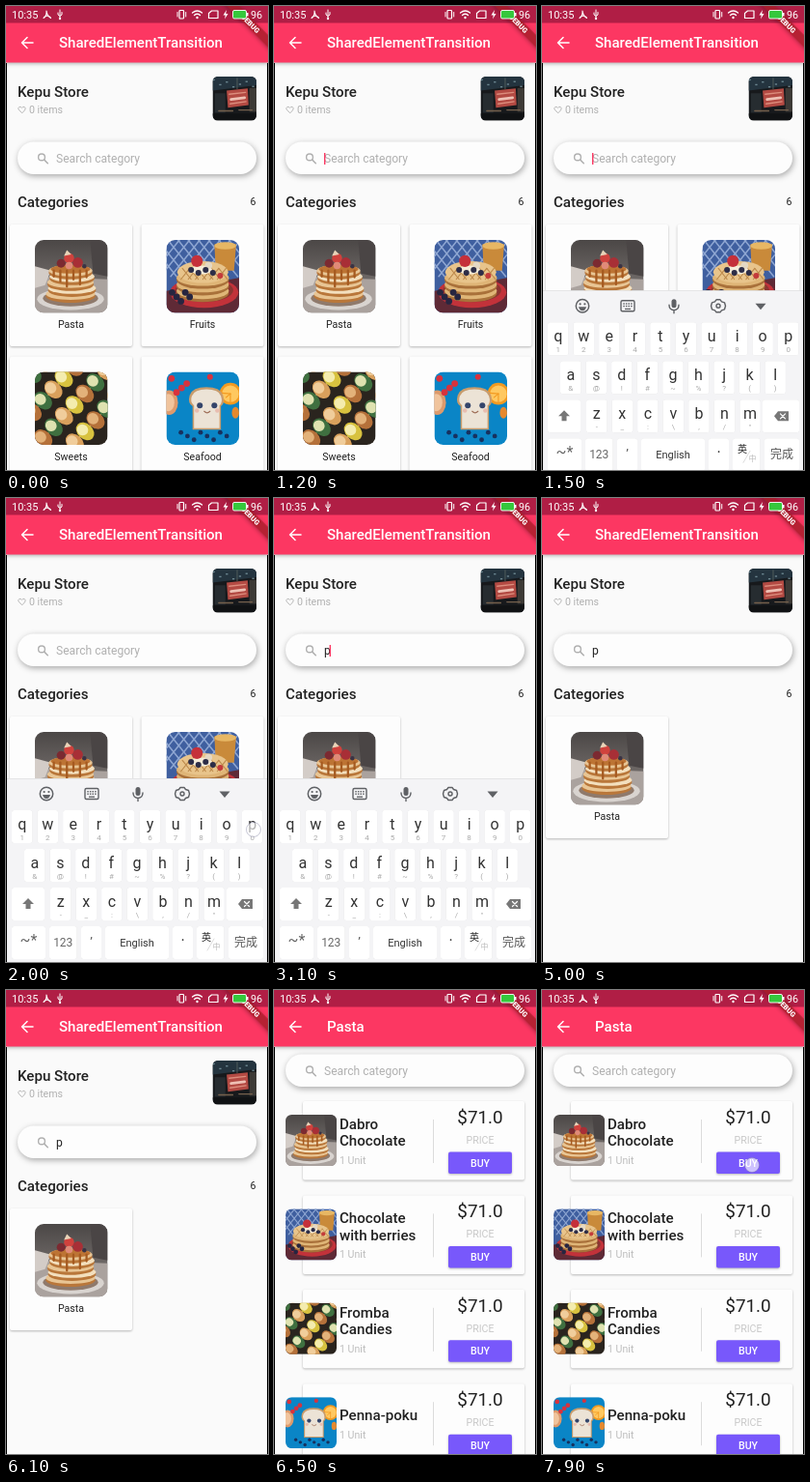
An HTML page for the animation above (8000 ms loop, 272 by 480 pixels).

```html
<!DOCTYPE html>
<html lang="en">
<head>
<meta charset="utf-8">
<title>Shared element transition</title>
<style>
  html, body { margin: 0; width: 100%; height: 100%; overflow: hidden; background: #fafafa; }
  svg { display: block; width: 272px; height: 480px; font-family: Roboto, "Noto Sans CJK SC", "Noto Sans CJK", sans-serif; }
  .bar { filter: drop-shadow(0 1.5px 2px #0005); }
  .pill { filter: drop-shadow(1px 2px 3px #0005); }
  .card { filter: drop-shadow(0 1px 1px #0004); }
  .key { filter: drop-shadow(0 .5px .5px #0002); }
  .line { fill: none; stroke-linecap: round; stroke-linejoin: round; }
</style>
</head>
<body>
<svg id="stage" viewBox="0 0 272 480"></svg>
<script>
const stage = document.getElementById('stage');
const PINK = '#fc3762', INK = '#212121', GREY = '#b0b0b0', ICON = '#5f6165', PAPER = '#fdfdfd';

const rect = (x, y, w, h, fill, extra = '') =>
  `<rect x="${x}" y="${y}" width="${w}" height="${h}" fill="${fill}" ${extra}/>`;
const circle = (x, y, r, fill, extra = '') => `<circle cx="${x}" cy="${y}" r="${r}" fill="${fill}" ${extra}/>`;
const oval = (x, y, rx, ry, fill) => `<ellipse cx="${x}" cy="${y}" rx="${rx}" ry="${ry}" fill="${fill}"/>`;
const line = (d, color, width = 1) => `<path class="line" d="${d}" stroke="${color}" stroke-width="${width}"/>`;
const shape = (d, fill) => `<path d="${d}" fill="${fill}"/>`;
const text = (x, y, str, size, fill = INK, extra = '') =>
  `<text x="${x}" y="${y}" font-size="${size}" fill="${fill}" ${extra}>${str}</text>`;
const mid = 'text-anchor="middle"', bold = 'font-weight="500"';
const times = (n, fn) => Array.from({ length: n }, (_, i) => fn(i)).join('');
const photo = (name, x, y, size, id = '') =>
  `<use href="#${name}" ${id && `id="${id}"`} x="${x}" y="${y}" width="${size}" height="${size}"/>`;

// Pictures, each on a 100 x 100 board
const pictures = {
  pancakes: () =>
    rect(0, 0, 100, 100, 'url(#dusk)') + shape('M0 50L100 54V100H0Z', '#aaa29e') +
    shape('M0 36L22 42 14 62 0 66Z', '#d3ccc7') + shape('M76 0h24v50L80 46Z', '#4a4545') +
    oval(49, 81, 46, 15, '#d9d4d0') + oval(49, 80, 38, 11, '#8f7a6c') +
    times(5, i => oval(49 + i % 2 * 2, 77 - i * 8, 34 - i, 9, '#b9773a') +
      oval(49 + i % 2 * 2, 74 - i * 8, 34 - i, 8, i % 2 ? '#f3dfbd' : '#e8c594')) +
    oval(49, 40, 27, 6, '#bd7434') +
    times(6, i => line(`M${26 + i * 9} 42v${8 + i * 7 % 17}`, '#a55a20', 3)) +
    circle(36, 32, 6, '#7c2a31') + circle(47, 25, 7, '#d0423d') + circle(59, 31, 7, '#a82f36') +
    circle(47, 35, 5, '#e08a78') + circle(68, 36, 3, '#3b3344') + shape('M40 22l4-8 6 6Z', '#e9d3b8'),
  waffle: () =>
    rect(0, 0, 100, 100, '#3f5f9f') +
    times(10, i => line(`M${i * 14 - 26} 0l40 50M${i * 14 - 10} 0l-40 50`, '#8ea6d2', 2)) +
    shape('M66 6h30l-3 36H68Z', '#c98a3a') + oval(81, 8, 15, 5, '#e7b764') +
    shape('M0 70L100 52V100H0Z', '#5f2a36') + oval(52, 72, 47, 21, '#c2323a') + oval(52, 69, 40, 16, '#8a3531') +
    times(3, i => oval(50, 73 - i * 9, 36, 12, '#a9713a') + oval(50, 70 - i * 9, 36, 11, '#dfb577')) +
    oval(50, 44, 35, 15, '#e8c48b') +
    times(6, i => line(`M${22 + i * 10} 39l12 15M${32 + i * 10} 39l-12 15`, '#bd8a4c', 1.5)) +
    oval(48, 41, 15, 6, '#f6ecd9') + circle(42, 29, 8, '#c5303a') + circle(58, 35, 5, '#e4d8c4') +
    times(4, i => circle(34 + i * 10, 41 + i % 2 * 4, 4, '#2d2d47')) + circle(74, 49, 4, '#c43b3a') +
    times(5, i => circle(8 + i * 6, 72 + i % 3 * 6, 4.5, '#272540')),
  skewers: () =>
    rect(0, 0, 100, 100, '#2a241e') +
    times(4, r => `<g transform="translate(${r * 29 - 6} ${r * 21 - 6}) rotate(-47)">` +
      line('M-70 8H90', '#d0ad7c', 2) +
      times(8, i => oval(i * 21 - 68, 8, 10.5, 14, ['#d9a05c', '#d8c23f', '#b5713a', '#3f7040'][(i + r) % 4]) +
        oval(i * 21 - 69, 4, 7.5, 8, ['#f0cd9b', '#f4ecae', '#e3b27a', '#dfe2b0'][(i + r) % 4])) + '</g>'),
  toast: () =>
    rect(0, 0, 100, 100, '#0a85c6') +
    circle(88, 30, 15, '#f39a20') + circle(88, 30, 11.5, '#ffc860') +
    times(3, i => line(`M88 30L${76 + i * 6} ${29 + i * 6}`, '#f39a20', 1.5)) +
    oval(4, 42, 12, 17, '#dd9a6c') + oval(3, 42, 8, 12, '#f0c49d') +
    times(4, i => circle(7 + i * 7, 9 + i * 19 % 25, 4.5, '#d8323d')) + circle(60, 7, 4, '#d8323d') +
    shape('M36 79V47Q29 43 32 32 36 21 55 21 74 21 78 32 81 43 75 47V79Z', '#c99c6c') +
    shape('M38 77V46Q32 41 35 33 39 24 55 24 72 24 75 33 78 42 73 46V77Z', '#ece3d6') +
    circle(46, 46, 4, '#34456b') + circle(66, 46, 4, '#34456b') + line('M52 54Q56 58 60 54', '#a0705a', 1.5) +
    circle(42, 53, 3, '#e8bdb0') + circle(70, 53, 3, '#e8bdb0') +
    times(8, i => circle(20 + i * 9, 83 + i % 3 * 5, 3.2, '#17315f')) + oval(95, 56, 5, 8, '#e5892f'),
  shop: () =>
    rect(0, 0, 100, 100, '#17191c') + shape('M0 0h100v20L0 32Z', '#24343f') +
    times(7, i => rect(i * 15, 6 + i * 11 % 17, 5, 3, '#6c8790')) + rect(5, 38, 24, 44, '#262c30') +
    rect(84, 26, 16, 54, '#3d3a36') + shape('M32 32L80 27 82 65 35 71Z', '#b34a43') +
    line('M38 40L75 36M40 62L76 57', '#dc8c7c', 3) + line('M42 52L73 48', '#eec0b4', 6) +
    line('M56 4V28', '#56605f', 2) + rect(0, 84, 100, 16, '#101214') + line('M14 78H46M60 76H90', '#75604c', 3)
};

const arrow = line('M28 38H16.500M22 32.500L16.500 38 22 43.500', '#fff', 1.5);
const appBar = title => rect(0, 0, 272, 58.5, PINK, 'class="bar"') + rect(0, 0, 272, 17.5, '#b01e45') +
  arrow + text(55, 43, title, 15.05, '#fff', bold);
const searchBar = (y, id) => rect(12, y + .5, 248, 33.5, PAPER, 'rx="16.750" class="pill"') +
  circle(37, y + 16.4, 3.4, 'none', `stroke="${GREY}" stroke-width="1.4"`) +
  line(`M39.700 ${y + 19.1}l3.600 3.600`, GREY, 1.5) +
  text(52, y + 21.5, 'Search category', 12.1, '#b0b0b0', `id="${id}"`);

const category = (col, row, name, label) => {
  const x = 4 + col * 136.5, y = 226 + row * 136.5;
  return rect(x, y, 127, 126, PAPER, 'rx="2" class="card"') +
    (name ? photo(name, x + 26, y + 16, 75.5) : '') + text(x + 63.5, y + 107, label, 10.6, INK, mid);
};

const home = rect(0, 0, 272, 480, '#fafafa') +
  text(12, 94, 'Kepu Store', 15.12, INK, bold) +
  line('M16.500 110.500L13.300 107.500Q11.900 105.500 13.800 104.400 15.500 103.800 16.500 105.400 17.500 103.800 19.200 104.400 21.100 105.500 19.700 107.500Z', GREY, .9) +
  text(24, 111, '0 items', 10.6, GREY) + photo('shop', 214.5, 73, 45.5) +
  searchBar(140, 'hint') + text(52, 161.5, 'p', 12.1, INK, 'id="typed"') +
  rect(52, 152, 1.4, 12, PINK, 'id="caret"') +
  text(12, 208, 'Categories', 15.12, INK, bold) + text(259.5, 206, '6', 10.6, INK, 'text-anchor="end"') +
  category(0, 0, '', 'Pasta') +
  `<g id="others">${category(1, 0, 'waffle', 'Fruits')}${category(0, 1, 'skewers', 'Sweets')}${category(1, 1, 'toast', 'Seafood')}</g>` +
  appBar('SharedElementTransition');

const product = (picture, lines, i) => {
  const y = 115 + i * 97.4, two = lines.length > 1, top = y + (two ? 29 : 37.5);
  return rect(30, y, 230, 81.5, PAPER, 'rx="2" class="card"') + (picture ? photo(picture, 12, y + 14, 53) : '') +
    lines.map((str, n) => text(68, top + n * 17.3, str, 15.12, INK, bold)).join('') +
    text(68, y + (two ? 65 : 57), '1 Unit', 10.6, '#bdbdbd') +
    rect(165, y + 19, 1, 45, '#dcdcdc') + text(214, y + 23, '$71.0', 18.9, INK, mid) +
    text(214, y + 44, 'PRICE', 10.6, '#c8c8c8', mid) +
    rect(181, y + 52.5, 66, 22.5, '#7858fb', 'rx="2" class="card"') +
    text(214, y + 67.5, 'BUY', 10.6, '#fff', mid + ' ' + bold);
};
const detail = rect(0, 0, 272, 480, '#fafafa') + searchBar(66, 'hint2') +
  [['', ['Dabro', 'Chocolate']], ['waffle', ['Chocolate', 'with berries']],
   ['skewers', ['Fromba', 'Candies']], ['toast', ['Penna-poku']]]
    .map(([picture, lines], i) => product(picture, lines, i)).join('') +
  appBar('Pasta');

// Keyboard
const key = (x, y, w, label = '', size = 16, color = '#333') => rect(x, y, w, 34, '#fff', 'rx="2.5" class="key"') +
  text(x + w / 2, y + (size > 13 ? 20 : 21), label, size, color, mid);
const letters = (x, y, chars, marks) => [...chars].map((c, i) =>
  key(x + i * 26.55, y, 21.5, c) +
  text(x + i * 26.55 + 10.75, y + 31, marks[i].replace('&', '&amp;'), 8, '#aaa', mid)).join('');
const micIcon = (x, y, k) => `<g transform="translate(${x} ${y}) scale(${k})">` +
  rect(-2.5, -7, 5, 9, ICON, 'rx="2.5"') + line('M-5 -1Q-5 4 0 4.500 5 4 5 -1M0 5V7.500', ICON, 1.4) + '</g>';
const toolbar =
  circle(42, 306, 6.7, 'none', `stroke="${ICON}" stroke-width="1.5"`) + circle(39.6, 304, 1.1, ICON) +
  circle(44.4, 304, 1.1, ICON) + shape('M38 307h8Q45 311 42 311T38 307Z', ICON) +
  rect(82, 300.5, 14, 11, 'none', `rx="1.5" stroke="${ICON}" stroke-width="1.4"`) +
  times(8, i => rect(84.3 + i % 4 * 2.6, 303 + (i >> 2) * 2.5, 1.5, 1.4, ICON)) + rect(86, 308.5, 6, 1.3, ICON) +
  micIcon(137, 306, 1) +
  line('M181 299.500h4l1.500 2 3 1 1 3.500-1 3.500-3 1-1.500 2h-4l-1.500-2-3-1-1-3.500 1-3.500 3-1Z', ICON, 1.4) +
  circle(183, 306, 2, 'none', `stroke="${ICON}" stroke-width="1.4"`) + shape('M221.500 303.500h11L227 310Z', ICON);
const keyboard = rect(0, 290, 272, 190, '#f4f4f6') + rect(0, 290, 272, .7, '#dedee0') + toolbar +
  letters(6, 323, 'qwertyuiop', '1234567890') +
  letters(19, 363, 'asdfghjkl', '&@!#~%?()') +
  letters(46, 403, 'zxcvbnm', '-_:\\,/"') +
  key(6, 403, 34) + shape('M23 414l6 6h-3.500v5h-5v-5H17Z', '#777') +
  key(229, 403, 38) + shape('M241 420l4-5h11v10h-11Z', '#777') + line('M247.500 417.500l5 5M252.500 417.500l-5 5', '#fff', 1.2) +
  key(6, 443, 35, '~*', 16, '#666') + key(45, 443, 28.5, '123', 12, '#666') + key(78, 443, 21, '’', 13, '#555') +
  key(103, 443, 66) + text(136, 463.5, 'English', 11, '#333', mid + ' id="english"') +
  `<g id="dictate">${micIcon(136, 456, .65)}${line('M123 461v4h26v-4', ICON)}</g>` +
  key(173, 443, 21, '·', 16) + key(198, 443, 28.5) + text(208, 458, '英', 10, '#222', mid) +
  line('M209 468L216 456', '#ccc', .7) + text(218.5, 467, '中', 8, '#bbb', mid) + key(231, 443, 36, '完成', 12, '#555');

const statusIcons = text(6, 12.7, '10:35', 11, '#fff') +
  line('M39 12.500Q42.500 10.500 42 5 42.500 10 46.500 12.500M39.500 11.500Q42.500 9 46 11.500', '#fff', 1.1) +
  line('M56 4v9M54 7v2l2 1.500 2-1.500V6.500', '#fff') + circle(56, 13, 1.2, '#fff') +
  rect(180, 4.5, 4.5, 8.5, 'none', 'rx=".8" stroke="#fff" stroke-width="1.2"') + line('M178 6.500v4.500M186.700 6.500v4.500', '#fff') +
  line('M193.500 7Q198.500 3 203.500 7M195.500 9.500Q198.500 7 201.500 9.500', '#fff', 1.3) + circle(198.5, 12, 1.2, '#fff') +
  line('M210.500 12.500V7.500l3-2.500h6.500v7.500Z', '#fff', 1.2) + shape('M229 4l-3.500 5.500h2.300l-.8 4 3.500-5.500h-2.300Z', '#fff') +
  rect(235.5, 4.5, 14, 8.5, '#35c83c', 'rx="1.5" stroke="#fff" stroke-width=".9"') + rect(250, 7, 1.5, 3.5, '#fff') +
  text(254, 12.7, '96', 10.8, '#fff');
const ribbon = `<g transform="translate(272 0) rotate(45)">${rect(-40, 21.2, 80, 9.1, '#a51c28', 'opacity=".8" class="bar"')}` +
  `${text(0, 28.5, 'DEBUG', 7.4, '#fff', mid + ' font-weight="900"')}</g>`;

stage.innerHTML = `<defs>
  <linearGradient id="dusk" x2="0" y2="1"><stop stop-color="#4b4746"/><stop offset="1" stop-color="#8b8481"/></linearGradient>
  <clipPath id="round"><rect width="100" height="100" rx="12"/></clipPath>
  ${Object.entries(pictures).map(([name, draw]) =>
    `<symbol id="${name}" viewBox="0 0 100 100"><g clip-path="url(#round)">${draw()}</g></symbol>`).join('')}
  </defs>${home}<g id="detail">${detail}</g>${photo('pancakes', 30, 242, 75.5, 'hero')}
  <g id="keyboard">${keyboard}</g>${ribbon}${statusIcons}
  ${rect(0, 59, 1, 421, '#000')}${rect(271, 59, 1, 421, '#000')}
  ${circle(0, 0, 7.5, '#ffffffa0', 'id="touch" stroke="#77779966"')}`;

const set = (id, attrs) => {
  const node = document.getElementById(id);
  Object.entries(attrs).forEach(([name, value]) => node.setAttribute(name, value));
};
const show = (id, on) => set(id, { opacity: +on });
const ramp = (t, from, to) => Math.min(1, Math.max(0, (t - from) / (to - from)));
const easeOut = p => 1 - (1 - p) ** 3;
const mix = (a, b, p) => a + (b - a) * p;

// start, end, x, y of each tap
const taps = [[1000, 1100, 110, 158], [2000, 2100, 257, 343], [4400, 4500, 227, 306],
  [5600, 5900, 68, 285], [7900, 8000, 218, 181]];

function draw(t) {
  const typed = t >= 2100;
  show('typed', typed);
  show('hint', !typed);
  show('others', t < 2200);
  set('caret', { x: typed ? 57.6 : 52, opacity: +(t >= 1100 && t < 4600 && (t - 100) % 1000 < 500) });

  const raised = easeOut(ramp(t, 1250, 1600)) - ramp(t, 4550, 4900) ** 2;
  set('keyboard', { transform: `translate(0 ${190 * (1 - raised)})` });
  const swap = ramp(t, 3450, 3800);
  set('english', { opacity: 1 - swap });
  set('dictate', { opacity: swap });

  const push = ramp(t, 6110, 6300), slide = easeOut(push), size = mix(75.5, 53, slide);
  set('detail', { opacity: push, transform: `translate(0 ${120 * (1 - slide)})` });
  set('hero', { x: mix(30, 12, slide), y: mix(242, 129, slide), width: size, height: size });

  const tap = taps.find(([from, to]) => t >= from && t < to);
  show('touch', !!tap);
  if (tap) set('touch', { cx: tap[2], cy: tap[3] });
}

function tick() {
  draw(performance.now() % 8000);
  requestAnimationFrame(tick);
}
tick();
</script>
</body>
</html>
```
